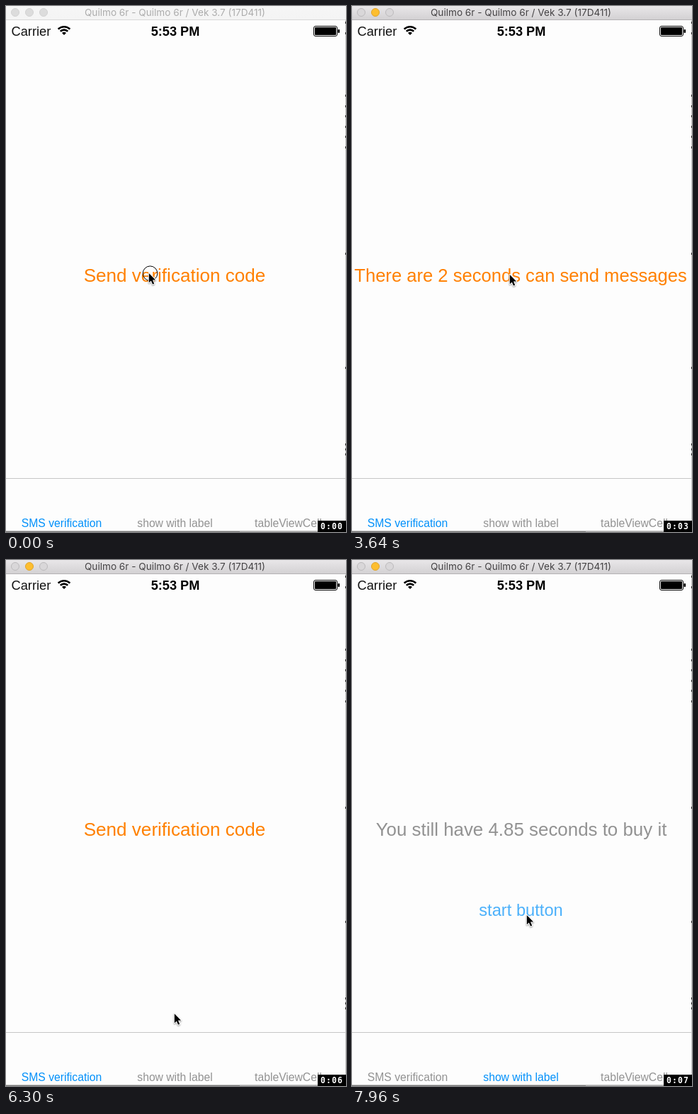
Recreate the animation shown at these times as an HTML page with a canvas. Size 480 by 742 pixels, loop 8 s.

```html
<!DOCTYPE html>
<html lang="en">
<head>
<meta charset="utf-8">
<style>
  html, body { margin: 0; width: 100%; height: 100%; overflow: hidden; background: #fdfdfd; }
  canvas { display: block; }
</style>
</head>
<body>
<canvas id="stage" width="480" height="742"></canvas>
<script>
const ctx = document.getElementById('stage').getContext('2d');
const LOOP = 8000;
const SANS = '"Liberation Sans", Arial, sans-serif';
const ORANGE = '#ff8000', BLUE = '#0090fa', GRAY = '#929292';

// Moments of the user's actions, ms
const FOCUS = 530, SEND = 650, SWITCH_TAB = 6760, PRESS = 7680, RELEASE = 7810;

const POINTER_START = { x: 201, y: 376 };
const POINTER_MOVES = [
  { from: 10, to: 110, x: 229, y: 376 },
  { from: 950, to: 1070, x: 222, y: 378 },
  { from: 5900, to: 6480, x: 241, y: 717 },
  { from: 6800, to: 7180, x: 239, y: 422 },
  { from: 7180, to: 7520, x: 246, y: 500 }
];

const clamp = v => Math.max(0, Math.min(1, v));
const smooth = k => k * k * (3 - 2 * k);
const hold = (t, step, offset = 0) => Math.floor((t + 5 - offset) / step) * step + offset;

function pointerAt(t) {
  const time = hold(t, 60);
  let { x, y } = POINTER_START;
  for (const move of POINTER_MOVES) {
    const k = smooth(clamp((time - move.from) / (move.to - move.from)));
    x += (move.x - x) * k;
    y += (move.y - y) * k;
  }
  return [Math.round(x), Math.round(y)];
}

function text(str, x, y, size, color, { align = 'center', weight = '', family = SANS } = {}) {
  ctx.font = `${weight} ${size}px ${family}`;
  ctx.fillStyle = color;
  ctx.textAlign = align;
  ctx.fillText(str, x, y);
}

function rect(x, y, w, h, color) {
  ctx.fillStyle = color;
  ctx.fillRect(x, y, w, h);
}

function roundRect(x, y, w, h, r, method) {
  ctx.beginPath();
  ctx.roundRect(x, y, w, h, r);
  ctx[method]();
}

function circle(x, y, r, stroke, fill = 'transparent') {
  ctx.beginPath();
  ctx.arc(x, y, r, 0, Math.PI * 2);
  ctx.fillStyle = fill;
  ctx.fill();
  ctx.lineWidth = 1;
  ctx.strokeStyle = stroke;
  ctx.stroke();
}

function titleBar(active) {
  const shade = ctx.createLinearGradient(0, 0, 0, 19);
  shade.addColorStop(0, active ? '#e9e7e9' : '#f6f6f6');
  shade.addColorStop(1, active ? '#d3d1d3' : '#f4f4f4');
  rect(0, 0, 480, 19, shade);
  rect(0, 19, 480, 1, active ? '#b4b2b4' : '#d8d8d8');
  for (let i = 0; i < 3; i++) {
    const lit = active && i === 1;
    circle(13 + 20 * i, 9, 5.5,
      lit ? '#e0a32a' : active ? '#bcbabc' : '#d2d2d2',
      lit ? '#fdbe2f' : active ? '#d9d7d9' : '#dcdcdc');
  }
  text('Quilmo 6r - Quilmo 6r / Vek 3.7 (17D411)', 238.5, 14, 13.6,
    active ? '#454345' : '#acacac', { family: 'Inter, sans-serif' });
}

function wifi(x, y) {
  const arc = r => ctx.arc(x, y, r, -Math.PI * 0.75, -Math.PI * 0.25);
  ctx.lineWidth = 2.6;
  for (const r of [7.4, 11.8]) {
    ctx.beginPath();
    arc(r);
    ctx.stroke();
  }
  ctx.beginPath();
  ctx.moveTo(x, y);
  arc(4.2);
  ctx.fill();
}

function statusBar() {
  text('Carrier', 7.5, 42, 18.3, '#111', { align: 'left' });
  text('5:53 PM', 239, 42, 18.2, '#000', { weight: 'bold' });
  ctx.strokeStyle = ctx.fillStyle = '#000';
  wifi(82, 41);
  ctx.lineWidth = 1;
  roundRect(434.5, 28.5, 33, 14, 2.5, 'stroke');
  roundRect(436, 30, 30, 11, 1, 'fill');
  roundRect(468.5, 33, 2.5, 5, 1, 'fill');
}

function specks(top, bottom, step) {
  for (let y = top; y <= bottom; y += step) rect(479, Math.round(y), 1, 3, '#222');
}

function windowEdges() {
  rect(479, 20, 1, 722, '#c9c9c9');
  specks(22, 37, 15);
  specks(125, 200, 14.5);
  specks(348, 509, 161);
  specks(617, 632, 7);
  rect(0, 740, 480, 1, '#c4c4c4');
  rect(0, 741, 480, 1, '#aaa');
  rect(0, 741, 330, 1, '#777');
}

function tabBar(selected) {
  rect(0, 666, 479, 1, '#c6c6c6');
  ['SMS verification', 'show with label', 'tableViewCell'].forEach((label, i) =>
    text(label, 78.5 + 160 * i, 735, 15.7, i === selected ? BLUE : GRAY));
}

function smsPage(t) {
  const left = 5 - Math.floor((t - 605) / 1001);
  if (t < SEND || left < 1) text('Send verification code', 238, 388.5, 26.1, ORANGE);
  else text(`There are ${left} seconds can send messages`, 238, 388.5, 25.6, ORANGE);
}

function labelPage(t) {
  const elapsed = hold(t, 70, 7610) - RELEASE;
  if (elapsed < 0) text('show label', 238.5, 389, 25.9, '#000');
  else text(`You still have ${(5 - elapsed / 1000).toFixed(2)} seconds to buy it`, 239, 389, 25.9, GRAY);

  ctx.globalAlpha = t < PRESS ? 1 : 0.2 + 0.8 * clamp((t - RELEASE) / 240);
  text('start button', 238.5, 502, 23.7, BLUE);
  ctx.globalAlpha = 1;
}

function pointer(t) {
  const [x, y] = pointerAt(t);
  if (t < SEND) circle(x + 2.5, y + 1.2, 10.3, '#000');
  ctx.save();
  ctx.translate(x + 0.8, y + 1);
  const arrow = new Path2D('M0 0V13.2L3 10.4 5.2 15.6 7.4 14.7 5.2 9.6 9.3 9.4Z');
  ctx.lineJoin = 'round';
  ctx.lineWidth = 2;
  ctx.strokeStyle = '#fff';
  ctx.shadowColor = 'rgba(0,0,0,0.4)';
  ctx.shadowBlur = 2;
  ctx.shadowOffsetY = 1;
  ctx.stroke(arrow);
  ctx.shadowColor = 'transparent';
  ctx.fillStyle = '#000';
  ctx.fill(arrow);
  ctx.restore();
}

function clock(t) {
  rect(440, 726, 40, 16, '#000');
  const seconds = Math.floor((t + 55) / 1000);
  [...`0:0${seconds}`].forEach((ch, i) =>
    text(ch, 447.5 + i * 8, 738, 11.4, '#fff',
      { weight: 'bold', family: '"DejaVu Sans Mono", monospace' }));
}

function draw(t) {
  rect(0, 0, 480, 742, '#fdfdfd');
  titleBar(t >= FOCUS);
  statusBar();
  const page = t < SWITCH_TAB ? 0 : 1;
  tabBar(page);
  [smsPage, labelPage][page](t);
  windowEdges();
  pointer(t);
  clock(Math.min(t, 7900));
}

const start = performance.now();
function tick() {
  draw((performance.now() - start) % LOOP);
  requestAnimationFrame(tick);
}
tick();
</script>
</body>
</html>
```
